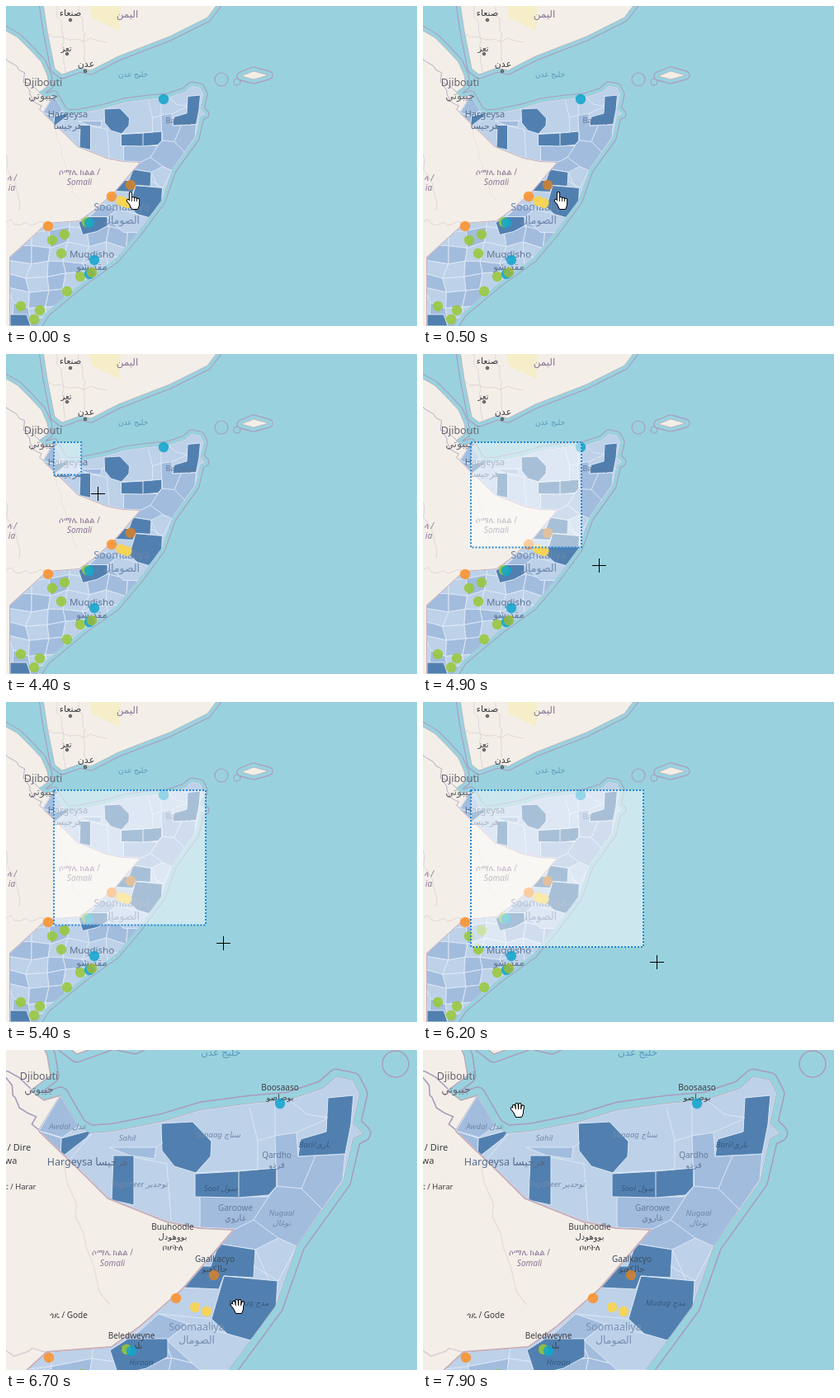
Write an HTML page that moves like this. It is 498 px wide and 388 px high and loops after 8 s.

```html
<!DOCTYPE html>
<html lang="en">
<head>
<meta charset="utf-8">
<title>Map box zoom</title>
<style>
html, body { margin: 0; width: 100%; height: 100%; overflow: hidden; background: #99d2de; }
svg { display: block; width: 498px; height: 388px; }
text { font-family: "Noto Sans", "DejaVu Sans", sans-serif; text-anchor: middle; }
</style>
</head>
<body>
<svg id="stage" viewBox="0 0 498 388"></svg>
<script>
const NS = 'http://www.w3.org/2000/svg';
const stage = document.getElementById('stage');

function add(parent, tag, attrs = {}, text) {
  const el = document.createElementNS(NS, tag);
  set(el, attrs);
  if (text) el.textContent = text;
  parent.append(el);
  return el;
}
function set(el, attrs) { for (const k in attrs) el.setAttribute(k, attrs[k]); }
const show = (el, on) => set(el, { display: on ? 'inline' : 'none' });
const group = (parent, attrs) => add(parent, 'g', attrs);
const area = (parent, fill, d) => add(parent, 'path', { d, fill });

// Repeatable noise in -0.5 .. 0.5
function noise(a, b) {
  const v = Math.sin(a * 127.1 + b * 311.7) * 43758.5453;
  return v - Math.floor(v) - .5;
}

const SEA = '#99d2de', LAND = '#f3efe8', LILAC = '#a99bbd';
const LIGHT = '#bdd1e9', MID = '#a2bcde', DARK = '#5180b0';

// Base map
const map = group(stage);
const border = '45 129 72 155 87 170 122 184 142 188 164 189 132 226 107 248 89 261 50 264 5 305 5 388';
const somalia = 'M58 108 69 127 76 131 90 130 120 124 143 117 173 113 196 111 217 104 225 97 235 99 239 107 ' +
  '235 125 241 131 235 134 229 160 201 199 188 236 160 274 133 306 95 333 48 372 38 388 5 388 5 305 50 264 ' +
  '89 261 107 248 132 226 164 189 142 188 122 184 87 170 72 155 45 129Z';
const west = `M-20 400V22L0 30 14 38 30 54 43 68 50 84 52 96 40 105 48 111 58 108 ${border} -20 400Z`;
const yemen = 'M44 -10 50 30 59 76 68 83 90 75 103 78 136 61 198 37 244 14 262 -10Z';
const socotra = 'M285 85 300 79 318 84 300 89Z';
const coasts = [somalia, west, yemen, socotra];
const marine = coasts.map(d => add(map, 'path', { d, fill: 'none', stroke: LILAC, 'stroke-linejoin': 'round' }));
const isles = group(map, { fill: 'none', stroke: LILAC });
add(isles, 'ellipse', { cx: 261, cy: 89, rx: 8, ry: 8 });
add(isles, 'circle', { cx: 280, cy: 92, r: 4 });
for (const d of coasts) add(map, 'path', { d, fill: SEA, stroke: SEA, 'stroke-width': 9, 'stroke-linejoin': 'round' });
for (const d of coasts) add(map, 'path', { d, fill: LAND, stroke: '#b9a9b8', 'stroke-width': .7 });
area(map, '#f6edc9', 'M100 -5 104 14 137 30 139 -5Z');

// Faint roads and borders wander between two ends
function wander(x0, y0, x1, y1, stroke = '#dccdd6', parts = 8) {
  let d = `M${x0} ${y0}`;
  for (let i = 1; i <= parts; i++) {
    const p = i / parts, w = i < parts ? 8 : 0;
    d += `L${x0 + (x1 - x0) * p + w * noise(i, y0)} ${y0 + (y1 - y0) * p + w * noise(x1, i)}`;
  }
  add(map, 'path', { d, fill: 'none', stroke, 'stroke-width': .8 });
}
wander(62, 0, 72, 80);
wander(88, 0, 97, 72);
wander(52, 34, 122, 44);
wander(0, 64, 40, 104, LILAC);
wander(24, 96, 45, 129, LILAC);
wander(0, 180, 16, 248);
wander(0, 262, 50, 264);
wander(60, 148, 88, 235, '#e8dedb');
add(map, 'path', { d: 'M' + border, fill: 'none', stroke: '#c9aebb', 'stroke-width': 2 });

// Districts: the south is a jittered grid, the north is drawn at double zoom
const edges = { stroke: '#dce7f4', 'stroke-linejoin': 'round' };
add(add(map, 'clipPath', { id: 'country' }), 'path', { d: somalia });
const districts = group(map, { ...edges, 'clip-path': 'url(#country)' });
area(districts, LIGHT, somalia);

const COLS = 8, ROWS = 8;
const corner = (i, j) => `${5 + i * 23 + 11 * noise(i + 1, j)} ${254 + j * 18 + 10 * noise(j + 3, i)} `;
for (let j = 0; j < ROWS; j++)
  for (let i = 0; i < COLS; i++)
    area(districts, noise(i + 9, j + 5) < 0 ? LIGHT : MID,
      'M' + corner(i, j) + corner(i + 1, j) + corner(i + 1, j + 1) + corner(i, j + 1) + 'Z');
area(districts, DARK, 'M5 374 25 374 30 388 5 388Z');

const north = group(districts, { transform: 'translate(25 80.5) scale(.5)' });
area(north, LIGHT, 'M213 290 165 335 145 356 195 352 235 388 285 388 328 300 302 242Z');
area(north, MID, 'M66 55 88 92 68 106 40 98ZM40 98 67 107 66 131 85 142Z' +
  'M125 118 182 118 180 132 150 128ZM185 320 220 332 195 352 145 356Z');
area(north, MID, 'M326 104 352 100 354 129 411 126 408 158 352 238 330 228 302 242 258 235 278 217 235 215 235 178 318 178 328 165Z');
area(north, DARK, 'M67 107 104 97 98 106 66 131ZM130 128 155 128 155 188 128 182ZM188 89 226 87 249 111 248 129 230 149 204 141 189 122Z' +
  'M229 150 281 147 328 143 328 165 318 176 282 179 229 178ZM390 58 421 55 418 90 411 126 354 129 357 108 388 99Z');
area(north, DARK, 'M258 235 302 242 300 276 264 274 258 290 213 288 235 262 248 262Z' +
  'M264 274 329 280 327 316 296 352 268 344 249 326 258 295ZM126 364 148 350 196 350 196 372 170 386 136 394Z');
area(north, 'none', 'M78 132 105 100V96M182 118 190 112M155 130 195 138 200 207M230 149 305 145 305 110 295 70M305 110 326 104V60' +
  'M282 147V178M345 62 365 78 390 82M352 100 388 84M375 128 358 168 328 165V143M358 168 385 195M318 178 300 206 278 217M300 206 330 228' +
  'M300 262 330 280 352 238M248 326 185 320M268 344 220 332 195 352');

// Labels: one or more centred lines
const IT = { 'font-style': 'italic' };
const INK = '#3c3c42', GREY = '#66636f', FADE = '#7189a9', DEEP = '#36587f', PURPLE = '#8b7396', BLUE = '#5a99bd';
function label(parent, x, y, size, fill, lines, extra) {
  lines.split('|').forEach((text, i) =>
    add(parent, 'text', { x, y: y + size * (.35 + 1.27 * i), 'font-size': size, fill, ...extra }, text));
}

const far = group(map);
label(far, 78, 8, 11, INK, 'صنعاء');
label(far, 147, 10, 12, PURPLE, 'اليمن');
label(far, 73, 51, 10, INK, 'تعز');
label(far, 97, 70, 11, INK, 'عدن');
label(far, 154, 83, 9, BLUE, 'خليج عدن');
label(far, 45, 93, 12.5, GREY, 'Djibouti|جيبوتي');
label(far, 75, 131, 11, '#566d8f', 'Hargeysa|هرجيسا');
label(far, 212, 139, 9, '#5d7596', 'Bari/باري');
label(far, 140, 244, 12.5, '#6d88ad', 'Soomaaliya|الصومال');
label(far, 104, 301, 11.5, '#5d7494', 'Muqdisho|مقديشو');
label(far, 89, 201, 10, PURPLE, 'ሶማሌ ክልል /');
label(far, 89, 213, 10, PURPLE, 'Somali', IT);
label(far, 7, 208, 10, PURPLE, 'ላ /|ia', IT);
for (const [cx, cy] of [[78, 17], [74, 58], [96, 79]])
  add(far, 'circle', { cx, cy, r: 1.8, fill: '#777', stroke: '#444', 'stroke-width': .8 });

const near = group(stage);
label(near, 260, 3, 12, BLUE, 'خليج عدن');
label(near, 40, 32, 12.5, GREY, 'Djibouti|جيبوتي');
label(near, 75, 93, 9.5, FADE, 'Awdal عدل', IT);
label(near, 147, 107, 9.5, FADE, 'Sahil', IT);
label(near, 257, 103, 9.5, FADE, 'Sanaag سناج', IT);
label(near, 374, 115, 9.5, DEEP, 'Bari/باري', IT);
label(near, 162, 163, 9.5, FADE, 'Togdheer توجدير', IT);
label(near, 260, 168, 9.5, DEEP, 'Sool سول', IT);
label(near, 334, 198, 9.5, FADE, 'Nugaal|نوغال', IT);
label(near, 294, 307, 9.5, DEEP, 'Mudug مدج', IT);
label(near, 164, 379, 9.5, DEEP, 'Hiraan', IT);
label(near, 99, 136, 12.5, '#566b8b', 'Hargeysa هرجيسا');
label(near, 328, 127, 10, '#657b9a', 'Qardho|قرذو');
label(near, 278, 191, 10, '#657b9a', 'Garoowe|غاروي');
label(near, 332, 45, 10, INK, 'Boosaaso|بوصاصو');
label(near, 202, 214, 10, INK, 'Buuhoodle|بووهودل|ቦሆትለ');
label(near, 253, 253, 10, '#3c4b60', 'Gaalkacyo|جالكعيو');
label(near, 152, 346, 10, INK, 'Beledweyne|بلدوين');
label(near, 231, 336, 12.5, '#7890b2', 'Soomaaliya|الصومال');
label(near, 129, 245, 10, PURPLE, 'ሶማሌ ክልል /');
label(near, 129, 258, 10, PURPLE, 'Somali', IT);
label(near, 76, 321, 10, INK, 'ጎዴ / Gode');
label(near, 16, 118, 11, INK, '/ Dire');
label(near, 6, 134, 11, INK, 'wa');
label(near, 17, 166, 9.5, INK, 'ር / Harar');

// Data points
const points = group(stage);
const spots = {
  '#98c83a': [[98, 262], [71, 277], [56, 284], [67, 300], [74, 346], [90, 328], [18, 364], [41, 369], [34, 380]],
  '#12a4cc': [[191, 113], [101, 263], [107, 308], [101, 325]],
  '#98b83a': [[104, 323]],
  '#fb922a': [[51, 267], [128, 231]],
  '#d5812c': [[151, 217]],
  '#fcd548': [[139.5, 236.5], [146.5, 239]]
};
const dots = Object.entries(spots).flatMap(([fill, list]) =>
  list.map(([cx, cy]) => add(points, 'circle', { cx, cy, fill, 'fill-opacity': .87 })));

// Selection box, click ripple and cursors
const LEFT = 58, TOP = 107;
const box = add(stage, 'rect', {
  x: LEFT, y: TOP, fill: '#fff', 'fill-opacity': .5, stroke: '#2588d6', 'stroke-width': 2, 'stroke-dasharray': '2 2'
});
const glow = add(stage, 'radialGradient', { id: 'glow' });
for (const [offset, color] of [[0, '#fff'], [.55, '#ee8b8f'], [.7, '#fb3038'], [1, '#f8262c']])
  add(glow, 'stop', { offset, 'stop-color': color });
const ripple = add(stage, 'circle', { cx: 268, cy: 299, fill: 'url(#glow)' });

// A hand is four round-capped fingers, a thumb and a palm
function hand(tips, base, spread) {
  const g = group(stage, { 'stroke-linecap': 'round', 'stroke-linejoin': 'round', fill: '#fff' });
  const fingers = tips.map((y, i) => `M${5 + 3 * i} ${base - 7}L${5 + 3 * i + spread * (i - 1.5)} ${y}`).join('');
  const d = `${fingers}M1.8 ${base - 9}L6 ${base - 4}M5.5 ${base - 7}H14V${base - 4}L12.5 ${base}H7.5L5.5 ${base - 4}Z`;
  add(g, 'path', { d, stroke: '#000', 'stroke-width': 4.2 });
  add(g, 'path', { d, stroke: '#fff', 'stroke-width': 2.2 });
  return g;
}
const pointer = hand([2, 8, 8.8, 9.8], 20, 0);
const grab = hand([4, 2, 2.2, 4.5], 16, .7);
const cross = add(stage, 'path', { d: 'M-8 .5H9M.5 -8V9', stroke: '#000' });

// Motion: [time, x, y]
const pointerPath = [[0, 146, 225], [100, 155, 234], [200, 155, 234], [400, 140, 194], [500, 159, 225],
  [3000, 159, 225], [3100, 131, 174], [3600, 66, 98]];
const crossPath = [[3900, 73, 124], [4400, 111, 169], [4800, 203, 249], [5400, 263, 292], [6100, 283, 315]];
const grabPath = [[7000, 272, 302], [7100, 286, 310], [7400, 95, 65], [7500, 117, 85], [7800, 117, 85], [7900, 106, 64]];

function along(path, t) {
  const next = path.findIndex(([time]) => time >= t);
  if (next <= 0) return path.at(next).slice(1);
  const [t0, x0, y0] = path[next - 1], [t1, x1, y1] = path[next];
  const p = (t - t0) / (t1 - t0);
  return [x0 + (x1 - x0) * p, y0 + (y1 - y0) * p];
}
const place = (el, [x, y]) => set(el, { transform: `translate(${Math.round(x)} ${Math.round(y)})` });

// cubic-bezier(0, 0, .25, 1), solved by bisection
function ease(p) {
  if (p <= 0 || p >= 1) return p <= 0 ? 0 : 1;
  let lo = 0, hi = 1;
  for (let i = 0; i < 20; i++) {
    const u = (lo + hi) / 2;
    if (.75 * (1 - u) * u * u + u ** 3 < p) lo = u; else hi = u;
  }
  return 3 * (1 - lo) * lo * lo + lo ** 3;
}

const STEP = 100, LOOP = 8000, PIVOT = [50, 161];
const PRESS = 3800, RELEASE = 6300, SETTLED = 6600, TILES = 6700;

function draw(t) {
  const s = 1 + ease((t - RELEASE - 16) / 250);
  const unit = t >= SETTLED ? 1 / s : 1;
  const line = t >= TILES ? 1.5 / s : 1.1;
  const [px, py] = PIVOT.map(v => v * (1 - s));
  for (const layer of [map, points]) set(layer, { transform: `translate(${px} ${py}) scale(${s})` });
  for (const el of marine) set(el, { 'stroke-width': 9 + 2 * line });
  set(isles, { 'stroke-width': line });
  set(districts, { 'stroke-width': unit });
  set(north, { 'stroke-width': 2 * unit });
  for (const el of dots) set(el, { r: 6.2 * unit });
  show(far, t < TILES);
  show(near, t >= TILES);

  const [bx, by] = along(crossPath, t - 50);
  show(box, t >= 4000 && t < RELEASE);
  set(box, { width: Math.max(0, bx - LEFT - 16), height: Math.max(0, by - TOP - 18) });
  show(ripple, t >= RELEASE && t < SETTLED);
  set(ripple, { r: 8 + (t - RELEASE) * .07, opacity: t >= 6500 ? .5 : 1 });

  show(pointer, t < PRESS);
  show(cross, t >= PRESS && t < RELEASE);
  show(grab, t >= RELEASE);
  place(pointer, along(pointerPath, t));
  place(cross, along(crossPath, t));
  place(grab, along(grabPath, t));
}

const start = performance.now();
function tick() {
  const t = (performance.now() - start) % LOOP;
  draw(Math.floor(t / STEP) * STEP);
  requestAnimationFrame(tick);
}
tick();
</script>
</body>
</html>
```
